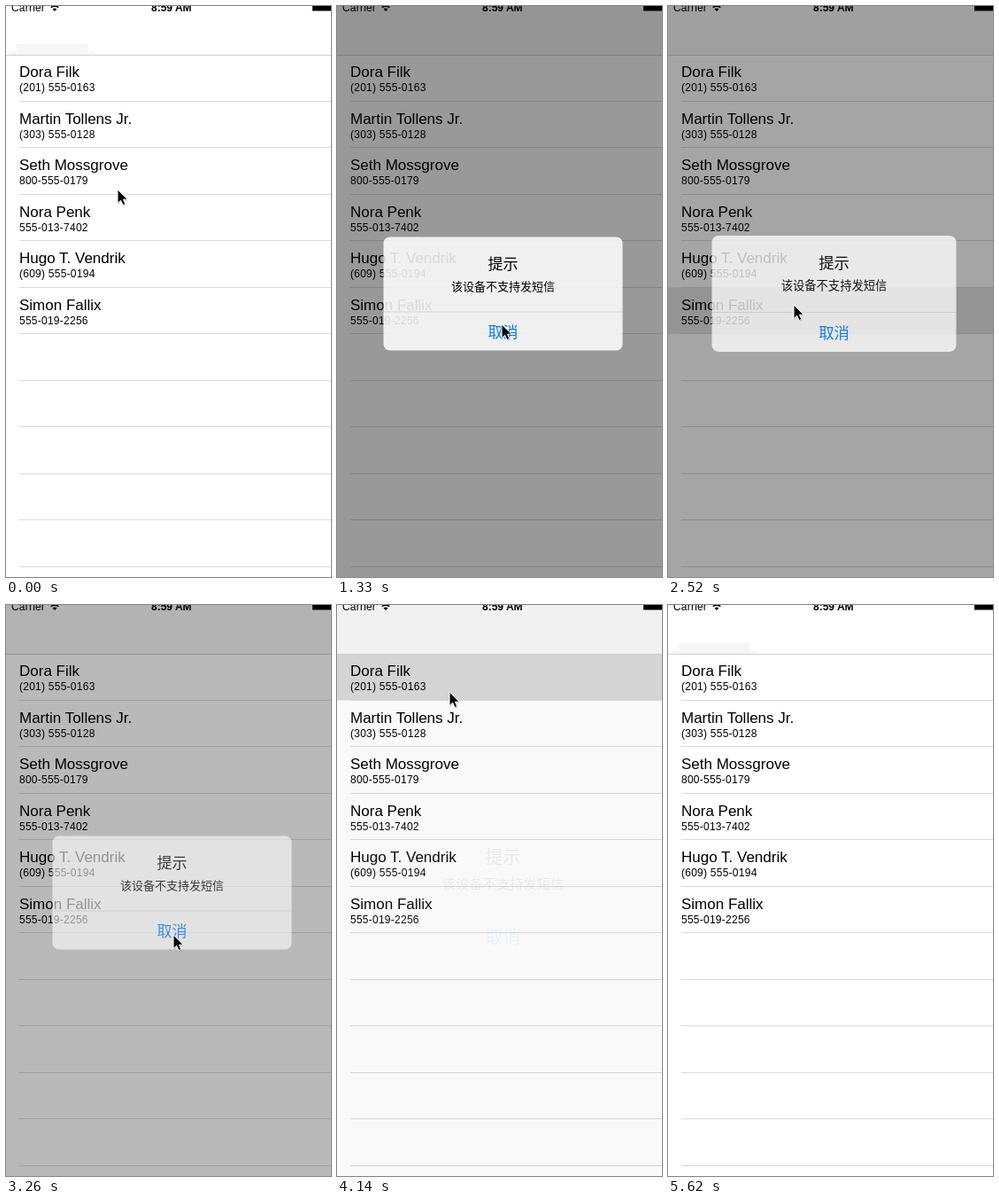
Recreate the animation shown at these times as an HTML page. Size 367 by 644 pixels, loop 6.01 s.

```html
<!DOCTYPE html>
<html lang="zh-CN">
<head>
<meta charset="utf-8">
<title>Contacts alert</title>
<style>
  html, body { margin: 0; width: 100%; height: 100%; overflow: hidden; background: #fff; }
  svg { display: block; width: 100%; height: 100%; font-family: "Liberation Sans", Arial, sans-serif; }
  .name { font-size: 17px; }
  .phone { font-size: 12px; letter-spacing: .25px; }
  .status { font-size: 12px; }
  #alert { font-family: "Noto Sans CJK SC", "Noto Sans CJK", sans-serif; font-size: 17px; text-anchor: middle; }
</style>
</head>
<body>
<svg viewBox="0 0 367 644">
  <rect width="367" height="644" fill="#fff"/>
  <rect id="nav" width="367" height="55" fill="#f7f7f7"/>
  <path id="patch" d="M12 43H92V51H100V55H4V51H12Z" fill="#f6f6f6"/>
  <rect id="highlight" width="367" height="52.5"/>
  <path d="M0 55.5H367" stroke="#cfcfcf"/>
  <g id="list"></g>
  <g class="status">
    <text x="6" y="6" letter-spacing=".2">Carrier</text>
    <text x="164" y="6" font-weight="bold">8:59 AM</text>
    <path d="M55 6L52.6 3.6A3.4 3.4 0 0 1 57.4 3.6Z"/>
    <path d="M50.8 1.8A6 6 0 0 1 59.2 1.8" fill="none" stroke="#000" stroke-width="1.6"/>
    <rect x="346" width="21" height="5.5"/>
  </g>
  <rect id="dim" width="367" height="644"/>
  <g id="alert">
    <rect x="-135" y="-64" width="270" height="128" rx="7" fill="#fff" fill-opacity=".85"/>
    <path d="M-135 20.5H135" stroke="#000" stroke-opacity=".12"/>
    <text y="-28" font-weight="500">提示</text>
    <text y="-4" font-size="13">该设备不支持发短信</text>
    <text y="49" font-weight="500" fill="#007aff">取消</text>
  </g>
  <g id="cursor">
    <path d="M0 0V15.5L3.6 12.2L6 17.6L8.8 16.4L6.4 11.2H11.2Z" transform="translate(.6 1.4)" opacity=".22"/>
    <path d="M0 0V15.5L3.6 12.2L6 17.6L8.8 16.4L6.4 11.2H11.2Z" stroke="#fff"/>
  </g>
</svg>
<script>
const LOOP = 6010, TICK = 147.9, ROW = 52.5, TOP = 55;
const $ = id => document.getElementById(id);

const contacts = [
  ["Dora Filk", "(201) 555-0163"],
  ["Martin Tollens Jr.", "(303) 555-0128"],
  ["Seth Mossgrove", "800-555-0179"],
  ["Nora Penk", "555-013-7402"],
  ["Hugo T. Vendrik", "(609) 555-0194"],
  ["Simon Fallix", "555-019-2256"],
];

// Tapped row, time the alert opens, time it closes
const taps = [[2, 400, 1640], [5, 2353, 3204], [0, 4124, 5080]];

// Pointer stops: time, x, y
const stops = [
  [0, 126, 207], [140, 122, 187], [640, 122, 186], [1470, 191, 373],
  [1780, 191, 373], [2340, 142, 337], [2600, 142, 337], [3100, 189, 372],
  [3260, 189, 372], [4050, 127, 98], [4300, 127, 98], [4880, 190, 372],
  [5180, 190, 372], [5600, 330, 664],
];

const lines = Array.from({ length: 11 }, (_, i) =>
  `<path d="M15 ${Math.floor(54.5 + ROW * (i + 1)) + .5}H367" stroke="#dadada"/>`);
const labels = contacts.map(([name, phone], i) =>
  `<text class="name" x="15" y="${80.3 + ROW * i}">${name}</text>
   <text class="phone" x="15" y="${96.3 + ROW * i}">${phone}</text>`);
$("list").innerHTML = lines.concat(labels).join("");

// Critically damped spring: 1 at rest, falling to 0
const spring = ms => {
  const x = Math.max(0, ms) * .023;
  return (1 + x) * Math.exp(-x);
};

function pointerAt(t) {
  const next = stops.findIndex(s => s[0] > t);
  if (next < 0) return stops[stops.length - 1].slice(1);
  const [t0, x0, y0] = stops[next - 1], [t1, x1, y1] = stops[next];
  const u = (t - t0) / (t1 - t0), e = u * u * (3 - 2 * u);
  return [x0 + (x1 - x0) * e, y0 + (y1 - y0) * e];
}

function render(t) {
  const tap = taps.filter(a => a[1] <= t).pop();
  let shown = 0, scale = 1, glow = 0;
  if (tap) {
    const [row, open, close] = tap, rest = spring(t - open);
    shown = (1 - rest) * spring(t - close);
    scale = 1 + .19 * rest;
    glow = Math.max(0, 1 - (t - open) / 500);
    $("highlight").setAttribute("y", TOP + ROW * row);
  }
  if (shown < .015) shown = 0;
  $("highlight").setAttribute("opacity", .155 * glow);
  $("nav").setAttribute("opacity", shown ? 1 : 0);
  $("patch").setAttribute("opacity", shown ? 0 : 1);
  $("dim").setAttribute("opacity", .4 * shown);
  $("alert").setAttribute("opacity", shown);
  $("alert").setAttribute("transform", `translate(187.5 324.5) scale(${scale})`);
  $("cursor").setAttribute("transform", `translate(${pointerAt(t).map(Math.round)})`);
}

// The picture advances in fixed steps
function frame() {
  const t = performance.now() % LOOP;
  render(Math.floor((t + 5) / TICK) * TICK);
  requestAnimationFrame(frame);
}
frame();
</script>
</body>
</html>
```
